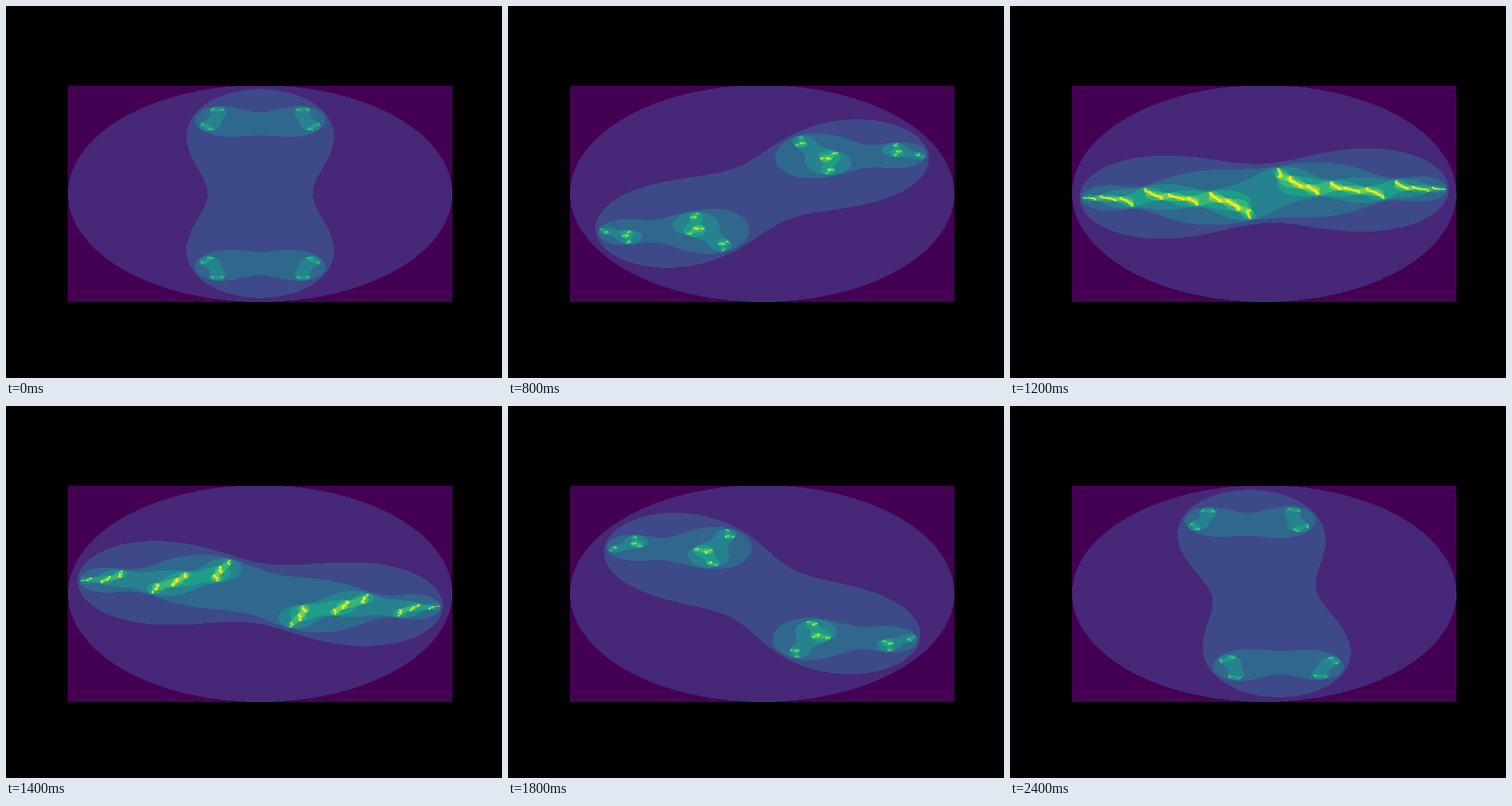
A matplotlib script that plays this animation: 640 px wide and 480 px high, repeating every 2.5 s.

```python
import numpy as np
import matplotlib.pyplot as plt
from matplotlib.animation import FuncAnimation

STAGE_W, STAGE_H = 640, 480
LEFT, TOP = 80, 102           # corner of the plotted plane
COLS, ROWS = 496, 280         # its size on the stage
GRID_W, GRID_H = 1280, 720    # resolution of the sampled plane
FRAMES, INTERVAL = 25, 100
MAX_ITER = 9
RADIUS = 1.7


def axis_samples(size, grid):
    """Nearest grid values of [-2, 2] seen by each stage pixel."""
    index = (2 * np.arange(size) + 1) * grid // (2 * size)
    return np.linspace(-2, 2, grid)[index]


x = axis_samples(COLS, GRID_W)
y = axis_samples(ROWS, GRID_H)[1:]   # the first row is clipped
plane = x[None, :] + 1j * y[:, None]
area = np.s_[TOP + 1:TOP + ROWS, LEFT:LEFT + COLS]


def julia(c):
    """Steps each point stays within |z| <= 2."""
    z = plane.copy()
    count = np.zeros(z.shape)
    for _ in range(MAX_ITER):
        inside = np.abs(z) <= 2
        count += inside
        z = np.where(inside, z * z + c, z)
    return count


def stage(k):
    picture = np.full((STAGE_H, STAGE_W), np.nan)
    picture[area] = julia(RADIUS * np.exp(2j * np.pi * k / FRAMES))
    return np.ma.masked_invalid(picture)


fig = plt.figure(figsize=(STAGE_W / 100, STAGE_H / 100), dpi=100,
                 facecolor="black")
ax = fig.add_axes([0, 0, 1, 1])
ax.axis("off")
image = ax.imshow(stage(0), cmap="viridis", vmin=0, vmax=MAX_ITER,
                  interpolation="nearest", aspect="auto")


def update(k):
    image.set_data(stage(k))
    return [image]


anim = FuncAnimation(fig, update, frames=FRAMES, interval=INTERVAL,
                     repeat=True, repeat_delay=0, blit=False)
plt.show()
```
